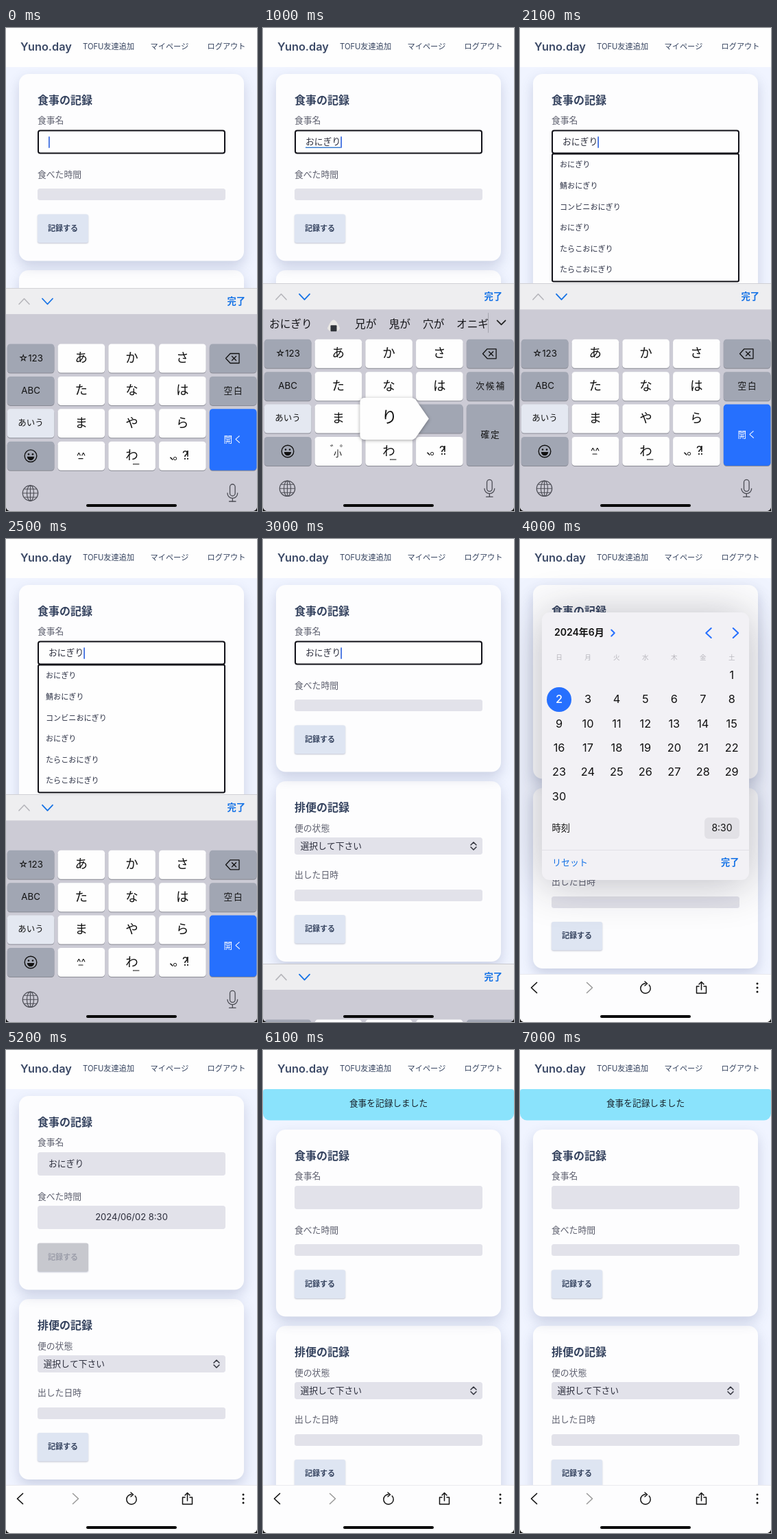
Recreate the animation shown at these times as an HTML page with a canvas. Size 366 by 704 pixels, loop 7100 ms.

```html
<!DOCTYPE html>
<html lang="ja">
<head>
<meta charset="utf-8">
<style>
html, body { margin: 0; width: 100%; height: 100%; overflow: hidden; background: #fff; }
canvas { display: block; width: 366px; height: 704px; }
</style>
</head>
<body>
<canvas id="stage"></canvas>
<script>
const W = 366, H = 704, LOOP = 7100, STEP = 100;
const BLUE = '#2670fe', LINK = '#1673e6', INK = '#35435f', FIELD = '#e2e2ea';
const FONT = 'Inter, "Noto Sans CJK JP", "Noto Sans CJK", sans-serif';
const canvas = document.getElementById('stage');
const ctx = canvas.getContext('2d');
const dpr = window.devicePixelRatio || 1;
canvas.width = W * dpr;
canvas.height = H * dpr;

const clamp = v => Math.max(0, Math.min(1, v));
const span = (t, a, b) => clamp((t - a) / (b - a));

function text(str, x, y, size, color, weight = 400, align = 'left', spacing = 0) {
  ctx.font = `${weight} ${size}px ${FONT}`;
  ctx.letterSpacing = spacing + 'px';
  ctx.fillStyle = color;
  ctx.textAlign = align;
  ctx.textBaseline = 'middle';
  ctx.fillText(str, x, y);
}

function box(x, y, w, h, r, fill, border, thickness = 2) {
  ctx.beginPath();
  ctx.roundRect(x, y, w, h, r);
  if (fill) { ctx.fillStyle = fill; ctx.fill(); }
  if (border) { ctx.strokeStyle = border; ctx.lineWidth = thickness; ctx.stroke(); }
}

function shadowed(color, blur, dy, paint) {
  ctx.save();
  ctx.shadowColor = color;
  ctx.shadowBlur = blur * dpr;
  ctx.shadowOffsetY = dy * dpr;
  paint();
  ctx.restore();
}

function strokes(color, width, ...paths) {
  ctx.strokeStyle = color;
  ctx.lineWidth = width;
  ctx.lineCap = ctx.lineJoin = 'round';
  for (const p of paths) {
    ctx.beginPath();
    for (let i = 0; i < p.length; i += 2) ctx.lineTo(p[i], p[i + 1]);
    ctx.stroke();
  }
}

function arc(x, y, rx, color, width, a = 0, b = Math.PI * 2, ry = rx) {
  ctx.strokeStyle = color;
  ctx.lineWidth = width;
  ctx.beginPath();
  ctx.ellipse(x, y, rx, ry, 0, a, b);
  ctx.stroke();
}

function dot(x, y, r, color) {
  ctx.fillStyle = color;
  ctx.beginPath();
  ctx.arc(x, y, r, 0, 7);
  ctx.fill();
}

// Chevron whose tip points along (dx, dy)
function chevron(x, y, dx, dy, len, half, color, width) {
  const a = dx * len / 2, b = dy * len / 2;
  strokes(color, width, [x - a - dy * half, y - b + dx * half, x + a, y + b, x - a + dy * half, y - b - dx * half]);
}

// ---------- page ----------
function card(y, h) {
  shadowed('rgba(70,80,130,.22)', 18, 8, () => box(19, y, 328, h, 14, '#fdfdfe'));
}

function button(y, disabled) {
  shadowed('rgba(60,70,110,.3)', 2, 1, () => box(46, y, 74, 41.5, 3, disabled ? '#c7c8ce' : '#dee5f2'));
  text('記録する', 61, y + 21, 11, disabled ? '#9b9da9' : INK, 700);
}

function header() {
  box(0, 0, W, 57, 0, '#fefefe');
  text('Yuno.day', 21, 28, 16.3, '#3b4966', 600);
  text('TOFU友達追加', 112, 28, 11.2, INK);
  text('マイページ', 210.5, 28, 11.2, INK);
  text('ログアウト', 293.5, 28, 11.2, INK);
}

const SUGGESTIONS = ['おにぎり', '鯖おにぎり', 'コンビニおにぎり', 'おにぎり', 'たらこおにぎり', 'たらこおにぎり'];

function mealCard(y, h, s) {
  card(y, h);
  text('食事の記録', 46, y + 39, 16, INK, 600);
  text('食事名', 46, y + 68.5, 12.8, '#5e606f', 500);
  if (s.focus) box(47, y + 82.5, 272, 33, 3, '#fefefe', '#111118');
  else box(46, y + 82, 274, 34, 4, FIELD);
  text(s.meal, 62, y + 99, 12.8, '#2b2d3b');
  if (s.focus) {
    const end = 62 + s.meal.length * 12.8;
    if (s.composing) box(62, y + 106.5, end - 62, 1.5, 0, '#3d7fcf');
    box(end, y + 91, 1.8, 17, 1, '#4170e0');
  }
  if (s.list) {
    box(47, y + 116.5, 272, 186, 2, '#fefefe', '#111118');
    SUGGESTIONS.forEach((item, i) => text(item, 58, y + 133 + i * 30.6, 11.1, '#2b3044'));
    y += 187;
  }
  text('食べた時間', 46, y + 147, 12.8, '#5e606f', 500);
  if (s.dated) {
    box(46, y + 160, 274, 34, 4, FIELD);
    text('2024/06/02 8:30', 183, y + 177.5, 13, '#2b2d3b', 400, 'center');
  } else box(46, y + 167, 274, 17, 3.5, FIELD);
  button(y + (s.dated ? 214.5 : 204.5), s.disabled);
}

function secondCard(y) {
  card(y, 263);
  text('排便の記録', 46, y + 39.5, 16, INK, 600);
  text('便の状態', 46, y + 69, 12.8, '#5e606f', 500);
  box(46, y + 82, 274, 25, 4, FIELD);
  text('選択して下さい', 54.5, y + 95, 12.8, '#2b2d3b');
  chevron(307, y + 91, 0, -1, 4, 4, '#30323c', 1.5);
  chevron(307, y + 98, 0, 1, 4, 4, '#30323c', 1.5);
  text('出した日時', 46, y + 137.5, 12.8, '#5e606f', 500);
  box(46, y + 158, 274, 17, 3.5, FIELD);
  button(y + 195);
}

function page(s) {
  box(0, 0, W, H, 0, '#f0f4ff');
  const top = s.flash ? 116 : 67;
  const h = 272.5 + (s.list ? 187 : 0) + (s.dated ? 10 : 0);
  secondCard(top + h + 13.5);
  mealCard(top, h, s);
  header();
  if (s.flash) {
    box(0, 57, W, 45.5, [4, 4, 10, 10], '#8ae3fc');
    text('食事を記録しました', 183, 78.5, 12.7, '#17232c', 400, 'center');
  }
}

function browserBar(y) {
  box(0, y, W, 80, 0, '#fdfdfe');
  box(0, y, W, 0.7, 0, '#e4e4ea');
  const c = y + 20;
  chevron(20.5, c, -1, 0, 8, 7.5, '#111', 1.7);
  chevron(101.5, c, 1, 0, 8, 7.5, '#999', 1.5);
  arc(183, c + 1, 7.2, '#111', 1.5, -0.75, Math.PI * 1.5);
  strokes('#111', 1.5, [182, c - 9, 185.5, c - 6, 182, c - 3]);
  strokes('#111', 1.5, [261, c - 2, 257.5, c - 2, 257.5, c + 8, 271.5, c + 8, 271.5, c - 2, 268, c - 2],
    [264.5, c + 3, 264.5, c - 8], [261, c - 5, 264.5, c - 8.5, 268, c - 5]);
  [-6, 0, 6].forEach(d => dot(346, c + d, 1.5, '#111'));
}

// ---------- keyboard ----------
const KEY_W = 68.6, KEY_H = 42, ROW = 47.4;
const KANA = ['あかさ', 'たなは', 'まやら'];
const CANDIDATES = {
  'お': 'お 尾 緒 おい 織 男',
  'おに': 'おに 鬼 お煮 兄 オニ',
  'おにき': 'おにき 鬼木 兄貴 鬼',
};
const FLICKS = [
  { from: 100, to: 300, col: 1, row: 0, dir: 'down', kana: 'お' },
  { from: 300, to: 500, col: 2, row: 1, dir: 'left', kana: 'に' },
  { from: 500, to: 700, col: 2, row: 0, dir: 'left', kana: 'き' },
  { from: 900, to: 1100, col: 3, row: 2, dir: 'left', kana: 'り' },
];
const keyX = col => 1.8 + col * 73.75;

function key(col, y, h, fill) {
  box(keyX(col), y + 1, KEY_W, h, 4.5, '#898a94');
  box(keyX(col), y, KEY_W, h, 4.5, fill);
}

function riceBall(x, y) {
  ctx.fillStyle = '#e9e7e4';
  ctx.beginPath();
  ctx.moveTo(x, y - 8);
  ctx.quadraticCurveTo(x + 4, y - 8, x + 9, y + 4);
  ctx.quadraticCurveTo(x + 9, y + 9, x, y + 9);
  ctx.quadraticCurveTo(x - 9, y + 9, x - 9, y + 4);
  ctx.quadraticCurveTo(x - 4, y - 8, x, y - 8);
  ctx.fill();
  box(x - 4.5, y, 9, 9, 1, '#30343a');
}

function candidates(meal, y) {
  if (CANDIDATES[meal]) {
    let x = 9;
    for (const word of CANDIDATES[meal].split(' ')) {
      text(word, x, y, 15.7, '#16161a');
      x += word.length * 15.7 + 21;
    }
  } else {
    text('おにぎり', 9, y, 15.7, '#16161a');
    riceBall(103, y + 1);
    ['兄が', '鬼が', '穴が'].forEach((w, i) => text(w, 134 + i * 49.5, y, 15.7, '#16161a'));
    ctx.save();
    ctx.beginPath();
    ctx.rect(280, y - 15, 48, 30);
    ctx.clip();
    text('オニギリ', 282, y, 15.7, '#16161a');
    ctx.restore();
  }
  box(328, y - 17, 0.8, 29, 0, '#9b9ba4');
  chevron(347.5, y - 3, 0, 1, 6, 6, '#222', 1.7);
}

function flickPopup(f, keysY) {
  const cx = keyX(f.col) + KEY_W / 2, cy = keysY + f.row * ROW + KEY_H / 2;
  const down = f.dir === 'down';
  const bx = down ? cx : cx - 77, by = down ? cy + 56 : cy;
  shadowed('rgba(0,0,0,.35)', 5, 1, () => {
    ctx.fillStyle = '#fefefe';
    ctx.beginPath();
    if (down) {
      ctx.moveTo(cx, cy - 6);
      ctx.lineTo(bx + 39, by - 33);
      ctx.lineTo(bx + 39, by + 27);
      ctx.arcTo(bx + 39, by + 32, bx, by + 32, 6);
      ctx.arcTo(bx - 39, by + 32, bx - 39, by, 6);
      ctx.lineTo(bx - 39, by - 33);
    } else {
      ctx.moveTo(cx - 15.5, cy);
      ctx.lineTo(bx + 42, by - 28);
      ctx.arcTo(bx + 38, by - 30.5, bx, by - 30.5, 6);
      ctx.arcTo(bx - 39, by - 30.5, bx - 39, by, 6);
      ctx.arcTo(bx - 39, by + 30.5, bx, by + 30.5, 6);
      ctx.arcTo(bx + 38, by + 30.5, bx + 42, by + 28, 6);
      ctx.lineTo(bx + 42, by + 28);
    }
    ctx.closePath();
    ctx.fill();
  });
  text(f.kana, down ? bx : bx + 4, by - 2, 23, '#111', 400, 'center');
}

function keyboard(t, top, s) {
  const grey = '#a1a6b3', white = '#fefefe', ink = '#111';
  box(0, top, W, H, 0, '#cccbd5');
  box(0, top, W, 38, 0, '#eeeef0');
  box(0, top, W, 0.8, 0, '#c9c9ce');
  chevron(26.5, top + 19.5, 0, -1, 8, 7.5, '#b6b6bb', 1.6);
  chevron(60.5, top + 19.5, 0, 1, 8, 7.5, LINK, 1.8);
  text('完了', 322.5, top + 19.5, 13.3, LINK, 600);
  if (s.composing) candidates(s.meal, top + 60);

  const keysY = top + 81.5;
  const rowY = r => keysY + r * ROW, mid = r => rowY(r) + KEY_H / 2;
  const flick = FLICKS.find(f => t >= f.from && t < f.to);
  const label = (str, col, r, size, gap = 0) =>
    text(str, keyX(col) + KEY_W / 2 + gap / 2, mid(r), size, ink, 400, 'center', gap);

  ['☆123', 'ABC', 'あいう', ''].forEach((str, r) => {
    key(0, rowY(r), KEY_H, r === 2 ? '#e4e8f1' : grey);
    label(str, 0, r, r === 2 ? 12.5 : 13.3);
  });
  arc(36, mid(3), 8.8, ink, 1.4);
  dot(33, mid(3) - 2.5, 1.3, ink);
  dot(39, mid(3) - 2.5, 1.3, ink);
  ctx.fillStyle = ink;
  ctx.beginPath();
  ctx.arc(36, mid(3) + 1, 5.2, 0, Math.PI);
  ctx.fill();

  for (let r = 0; r < 4; r++) for (let c = 1; c < 4; c++) {
    const held = flick && flick.col === c && flick.row === r;
    const tapped = r === 3 && c === 1 && t >= 700 && t < 800;
    key(c, rowY(r), KEY_H, held || tapped ? grey : white);
    if (r < 3 && !held) label(KANA[r][c - 1], c, r, 18.5);
  }
  if (s.composing) {
    text('゛゜', 112, mid(3) - 2, 14, ink, 400, 'center');
    text('小', 109, mid(3) + 4, 12, ink, 400, 'center');
  } else {
    text('^^', 109.5, mid(3) + 1, 14, ink, 400, 'center');
    strokes(ink, 1.2, [106, mid(3) + 4, 112, mid(3) + 4]);
  }
  label('わ', 2, 3, 18.5);
  strokes(ink, 1, [185, mid(3) + 12, 194, mid(3) + 12]);
  text('、。?!', 238, mid(3), 17, ink, 400, 'left', -3.2);

  key(4, rowY(0), KEY_H, grey);
  const d = mid(0);
  strokes(ink, 1.3, [320.5, d, 327, d - 7, 340, d - 7, 340, d + 7, 327, d + 7, 320.5, d],
    [329.5, d - 3, 335.5, d + 3], [335.5, d - 3, 329.5, d + 3]);
  key(4, rowY(1), KEY_H, grey);
  label(s.composing ? '次候補' : '空白', 4, 1, 12.6, 2);
  const confirming = t >= 1400 && t < 1500;
  key(4, rowY(2), KEY_H + ROW, s.composing ? (confirming ? white : grey) : BLUE);
  text(s.composing ? '確定' : '開く', 332, mid(2) + ROW / 2, 12.6, s.composing ? ink : '#fff', 400, 'center', 2);

  const g = top + 299, icon = '#4c4d55';
  arc(35.5, g, 11.2, icon, 1.2);
  arc(35.5, g, 5, icon, 1.1, 0, 7, 11.2);
  strokes(icon, 1.1, [24.5, g, 46.5, g], [35.5, g - 11, 35.5, g + 11], [27, g - 6, 44, g - 6], [27, g + 6, 44, g + 6]);
  box(326.5, g - 13, 7.6, 17, 4, null, icon, 1.3);
  arc(330.3, g, 7.4, icon, 1.3, 0, Math.PI);
  strokes(icon, 1.3, [330.3, g + 8, 330.3, g + 12], [325.5, g + 12, 335, g + 12]);
  if (flick) flickPopup(flick, keysY);
}

// ---------- date picker ----------
function picker(p) {
  if (p <= 0) return;
  const k = 0.2 + 0.8 * (1 - (1 - p) ** 3);
  ctx.save();
  ctx.globalAlpha = p;
  ctx.translate(183, 244);
  ctx.scale(k, k);
  ctx.translate(-183, -244);
  shadowed('rgba(30,30,50,.3)', 65, 4, () => box(32, 107, 302, 390, 11, '#f2f1f5'));
  text('2024年6月', 50, 137, 14, '#111', 600);
  chevron(135.5, 137, 1, 0, 4.5, 4.5, BLUE, 2);
  chevron(275, 137, -1, 0, 7.5, 7, BLUE, 2);
  chevron(314.5, 137, 1, 0, 7.5, 7, BLUE, 2);
  const colX = c => 57 + c * 41.95;
  [...'日月火水木金土'].forEach((d, c) => text(d, colX(c), 173.5, 9.6, '#b7b6bc', 500, 'center'));
  dot(57, 234, 18, BLUE);
  for (let day = 1; day <= 30; day++) {
    const cell = day + 5;
    text(day, colX(cell % 7), 199 + Math.floor(cell / 7) * 35.4, 16.3,
      day === 2 ? '#fff' : '#111', day === 2 ? 500 : 400, 'center');
  }
  text('時刻', 46.5, 422, 13.2, '#111', 500);
  box(269, 406, 51, 31, 6, '#e2e1e6');
  text('8:30', 294.5, 422, 14, '#111', 400, 'center');
  box(32, 453, 302, 0.8, 0, '#dddce2');
  text('リセット', 47, 472, 13, LINK);
  text('完了', 293, 472, 13.2, LINK, 600);
  ctx.restore();
}

// ---------- schedule ----------
const TYPED = [[200, 'お'], [400, 'おに'], [600, 'おにき'], [700, 'おにぎ'], [1000, 'おにぎり']];

function stateAt(t) {
  const flash = t >= 5900;
  const typed = TYPED.filter(([at]) => t >= at).pop();
  return {
    flash,
    meal: typed && !flash ? typed[1] : '',
    composing: t >= 200 && t < 1500,
    list: t >= 1800 && t < 2600,
    focus: t < 3300,
    dated: t >= 3400 && !flash,
    disabled: t >= 5000 && !flash,
  };
}

function draw(t) {
  const s = stateAt(t);
  ctx.setTransform(dpr, 0, 0, dpr, 0, 0);
  page(s);
  if (t >= 3200) browserBar(634 + 70 * (1 - span(t, 3100, 3300)));
  if (t < 3300) {
    const slide = 1 - (1 - span(t, 2800, 3300)) ** 2.663;
    keyboard(t, (t < 200 ? 379 : 372.3) + 332 * slide, s);
  }
  picker(Math.min(span(t, 3500, 3800), 1 - span(t, 4500, 4800)));
  box(117, 694, 132, 4, 2, '#050505');
  ctx.fillStyle = '#111';
  for (const [x, dir] of [[0, 1], [W, -1]]) {
    ctx.beginPath();
    ctx.moveTo(x, H - 5);
    ctx.quadraticCurveTo(x + dir, H - 1, x + 5 * dir, H);
    ctx.lineTo(x, H);
    ctx.fill();
  }
}

function frame() {
  draw(Math.floor((performance.now() % LOOP) / STEP) * STEP);
  requestAnimationFrame(frame);
}
frame();
</script>
</body>
</html>
```
